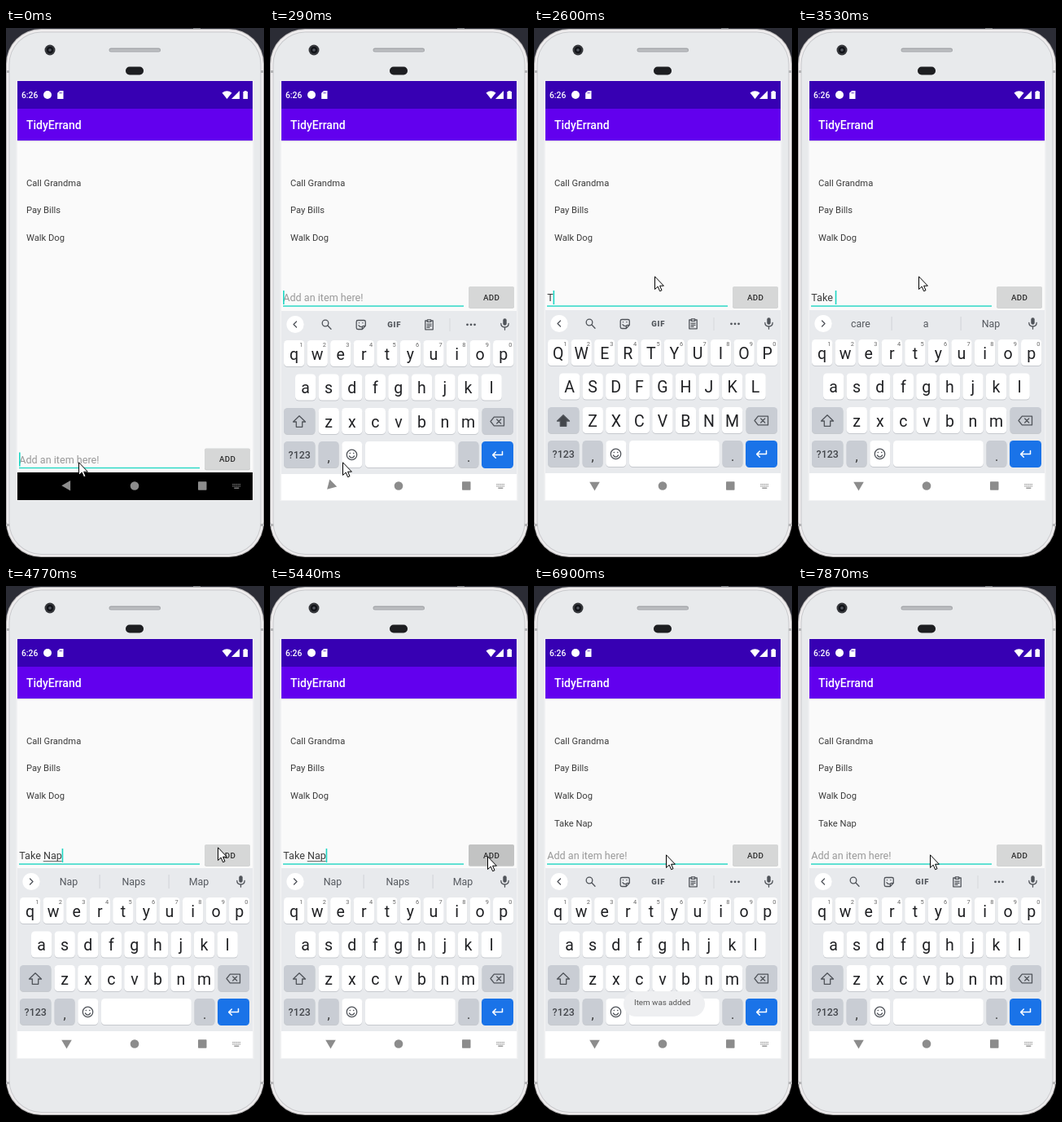
These frames come from a looping animation (317 px wide and 650 px high, 8000 ms). An HTML page:

```html
<!DOCTYPE html>
<html lang="en">
<head>
<meta charset="utf-8">
<title>To-do app</title>
<style>
html, body { margin: 0; width: 100%; height: 100%; overflow: hidden; background: #000; }
svg { display: block; width: 317px; height: 650px; }
text { font-family: Roboto, sans-serif; white-space: pre; }
.mid { text-anchor: middle; }
.line { fill: none; stroke: #50545a; stroke-width: 1.3; stroke-linecap: round; stroke-linejoin: round; }
</style>
</head>
<body>
<svg id="stage" viewBox="0 0 317 650" xmlns="http://www.w3.org/2000/svg"></svg>
<script>
const LOOP = 8000;
const ROW_DROP = 198.5;
const stage = document.getElementById('stage');
const $ = id => document.getElementById(id);

const rect = (x, y, w, h, fill, r = 0, extra = '') =>
  `<rect x="${x}" y="${y}" width="${w}" height="${h}" rx="${r}" fill="${fill}" ${extra}/>`;
const text = (x, y, size, fill, str, extra = '') =>
  `<text x="${x}" y="${y}" font-size="${size}" fill="${fill}" ${extra}>${str}</text>`;
const path = (d, extra = 'class="line"') => `<path d="${d}" ${extra}/>`;
const circle = (x, y, r, fill, extra = '') =>
  `<circle cx="${x}" cy="${y}" r="${r}" fill="${fill}" ${extra}/>`;

function phone() {
  const seams = [52, 608].map(y =>
    rect(0, y, 4, 3, '#b4b4b6') + rect(313, y, 4, 3, '#b4b4b6')).join('');
  return rect(0, 0, 317, 650, '#000') + rect(0, 0, 317, 60, '#2b2c35') +
    rect(230, 0, 9, 3, '#777a80') +
    rect(0, 1, 317, 648, '#b5b3b4', 43) +
    rect(1, 2, 315, 646, '#efedee', 42) +
    rect(3.5, 4.5, 310, 641.5, '#c9cacd', 40) + seams +
    rect(4.5, 5.5, 308, 639.5, '#e8eaec', 39) +
    rect(12.5, 64, 292, 516, '#f1f2f3') +
    circle(54, 27, 6.5, '#34363a') + circle(54, 27, 4, '#111318') + circle(54, 27, 1.8, '#53575f') +
    rect(126.5, 24.5, 63.5, 5, '#a4a6aa', 2.5) + rect(127.5, 26, 61.5, 2.5, '#bcbec1', 1.2) +
    rect(147, 47.5, 22, 10, '#1d1e21', 4.8);
}

function appBars() {
  return rect(14, 65, 289, 34, '#3700b3') + rect(14, 99, 289, 39, '#6200ee') +
    text(19, 86, 10.3, '#fff', '6:26', 'font-weight="500"') +
    circle(51, 82, 5, '#fff') +
    path('M66 77h4.5v10h-7.3v-7.3z', 'fill="#fff"') +
    path('M66.3 78.5v2M68.1 78.5v2', 'stroke="#3700b3" stroke-width=".8"') +
    path('M265.5 79.5q6-4.5 12 0l-6 7.5z', 'fill="#fff"') +
    path('M287 77v10h-10z', 'fill="#fff"') +
    path('M292.8 77h2.8v1h1.4v9h-5.6v-9h1.4z', 'fill="#fff"') +
    text(25, 124.3, 14, '#fff', 'TidyErrand', 'font-weight="500"');
}

function list() {
  return ['Call Grandma', 'Pay Bills', 'Walk Dog', 'Take Nap'].map((s, i) =>
    text(25, 193.5 + i * 33.8, 11.2, '#3c3c3c', s, i === 3 ? 'id="newItem"' : '')).join('');
}

function inputRow() {
  return `<g id="row">` +
    text(16.3, 335.3, 12.6, '#999', 'Add an item here!', 'id="hint"') +
    text(16.3, 335.3, 12.6, '#3c3c3c', '', 'id="typed"') +
    rect(16, 337, 10, 0.9, '#555', 0, 'id="compose"') +
    rect(16, 340.3, 222, 1.5, '#2fd9c7') +
    rect(16, 322, 1.6, 17, '#1cd6c3', 0, 'id="caret"') +
    rect(244, 317.7, 56, 26, '#c4c5c5', 2) +
    rect(244, 317, 56, 26, '#d6d7d7', 2, 'id="button"') +
    text(272, 333.6, 9.8, '#2a2a2a', 'ADD', 'class="mid" font-weight="500" letter-spacing=".3"') + `</g>`;
}

const key = (x, y, w, fill = '#fff') =>
  rect(x, y + 1, w, 32, '#c6c9ce', 4.5) + rect(x, y, w, 32, fill, 4.5);

function letters() {
  const rows = [['qwertyuiop', 17, 382], ['asdfghjkl', 31, 423.5], ['zxcvbnm', 59.6, 465]];
  return rows.map(([chars, x0, y], r) => [...chars].map((c, i) => {
    const x = x0 + i * 28.56;
    return key(x, y, 25.3) +
      text(x + 12.6, y + 23.7, 19.5, '#202124', c, 'class="mid letter"') +
      (r ? '' : text(x + 21.3, y + 8.4, 7.4, '#666', (i + 1) % 10, 'class="mid"'));
  }).join('')).join('');
}

function strip() {
  const dots = [242.5, 247, 251.5].map(x => circle(x, 362.8, 1.4, '#50545a')).join('');
  const tools =
    circle(68, 361, 3.8, 'none', 'class="line"') + path('M71 364l4 4.3') +
    path('M108 357.5h7.5q1.8 0 1.8 1.8v5l-4 4.2h-5.3q-1.8 0-1.8-1.8v-7.4q0-1.8 1.8-1.8zM117.3 364.3h-2.4q-1.6 0-1.6 1.6v2.6M109 363.6q1.2 2.2 3.3 1.8M109.4 360.7h.2M113.8 360.7h.2') +
    text(152.7, 366, 9.6, '#50545a', 'GIF', 'class="mid" font-weight="900" letter-spacing=".7"') +
    path('M192.5 358h-1.7v10.8h9.4v-10.8h-1.7M193.4 356.8h4.2v2.6h-4.2zM193 362.2h5M193 364.3h5M193 366.4h3') +
    rect(220.5, 355, 1, 16, '#d5d8dc') + dots;
  const words = [77, 157, 237].map(x =>
    text(x, 367, 12.4, '#54585e', '', 'class="mid word"')).join('');
  return circle(31, 362.5, 10.6, '#fff') + path('M0 0', 'id="chevron" class="line"') +
    `<g id="tools">${tools}</g>` +
    `<g id="words">${words}${rect(114.6, 354, 1, 17, '#d0d3d7')}${rect(199.6, 354, 1, 17, '#d0d3d7')}</g>` +
    rect(286.3, 355.3, 4.4, 8.5, '#50545a', 2.2) + path('M283.8 361.3q0 4.7 4.7 4.7t4.7-4.7M288.5 366.2v3');
}

function keyboard() {
  const gray = '#c9cdd4';
  const arrow = 'M36 474.7l7.5 7.3h-3.8v6.3h-7.4V482h-3.8z';
  return rect(14, 346, 289, 200, '#e8eaed') + strip() + letters() +
    key(17, 465, 38.5, gray) + path(arrow, 'id="shift" class="line"') +
    key(260.5, 465, 38.5, gray) +
    path('M271 481.5l4.3-5.4h12.2v10.8h-12.2zM278.7 479l5 5M283.7 479l-5 5') +
    key(17, 506, 38.5, gray) + text(36.2, 527, 12.4, '#44474c', '?123', 'class="mid" font-weight="500"') +
    key(59.6, 506, 25, gray) + text(72.2, 531, 16, '#333', ',', 'class="mid"') +
    key(88.3, 506, 25) + circle(100.5, 522.4, 6.2, 'none', 'class="line"') +
    path('M97.4 524q3.1 4.2 6.2 0M98.2 520.5h.3M102.6 520.5h.3') +
    key(117, 506, 110.8) +
    key(231.5, 506, 25, gray) + text(244, 531, 16, '#333', '.', 'class="mid"') +
    rect(260, 506, 39, 33, '#1a73e8', 4.5) +
    path('M285.5 518.6v4h-11.8m3.6-3.6l-3.6 3.6 3.6 3.6', 'class="line" style="stroke:#fff;stroke-width:1.5"');
}

function nav() {
  const dots = [0, 1, 2, 3, 4].map(i => rect(278.3 + i * 2.1, 559, 1.2, 1.3, '#8c8c8c') +
    rect(278.3 + i * 2.1, 561.3, 1.2, 1.3, '#8c8c8c')).join('');
  return rect(14, 545, 289, 34, '#000') +
    rect(14, 545, 289, 34, '#fff', 0, 'id="navLight"') +
    path('M68.3 561.3l10.8-6.3v12.6z', 'id="back" fill="#8c8c8c"') +
    circle(158, 561.5, 5.3, '#8c8c8c') + rect(236, 556.3, 10.5, 10.5, '#8c8c8c', 0.8) +
    dots + rect(280.3, 563.6, 6, 1.3, '#8c8c8c');
}

stage.innerHTML = phone() + appBars() + rect(14, 138, 289, 407, '#fafafa') +
  rect(14, 138, 289, 1, '#e0dee6') + rect(14, 139, 289, 1, '#f2f1f4') +
  list() + inputRow() + nav() + `<g id="keys">${keyboard()}</g>` +
  `<g id="toast">${rect(110, 497, 100, 31, '#eeeff1', 15.5)}${text(123, 514.2, 9.8, '#555', 'Item was added')}</g>` +
  path('M.5.8v15.7l3.7-3.4 2.4 5.6 2.4-1-2.4-5.5h4.8z',
    'id="mouse" fill="#fff" stroke="#000" stroke-width="1" stroke-linejoin="round"');

// Each track is a list of [start, value]; the value holds until the next start.
const tracks = {
  slide: [[0, null], [150, { y: 9, alpha: 0.6, turn: -12 }], [290, { y: 1, alpha: 1, turn: -45 }],
    [410, { y: 0, alpha: 1, turn: -80 }], [530, { y: 0, alpha: 1, turn: -90 }]],
  typed: [[0, ''], [2600, 'T'], [2850, 'Ta'], [3130, 'Tak'], [3270, 'Take'], [3410, 'Take '],
    [3810, 'Take N'], [4090, 'Take Na'], [4380, 'Take Nap'], [5460, '']],
  // start of the underlined part, -1 for none
  compose: [[0, -1], [2720, 0], [3530, -1], [3810, 5], [5460, -1]],
  words: [[0, ''], [2720, 'T The This'], [2990, 'Ta Take Talk'], [3130, 'Tak Take Taken'],
    [3270, 'Take Taken Takes'], [3530, 'care a Nap'], [3950, 'N No Not'], [4240, 'Na Nap Name'],
    [4380, 'Nap Naps Map'], [5460, '']],
  caps: [[0, false], [2450, true], [2720, false]],
  caret: [[0, true], [900, false], [1450, true], [1880, false], [2450, true], [4920, false],
    [5320, true], [5870, false], [6440, true], [6900, false], [7330, true], [7870, false]],
  button: [[0, '#d6d7d7'], [5320, '#c2c3c3'], [5460, '#cacbcb'], [5600, '#d6d7d7']],
  item: [[0, false], [5460, true]],
  toast: [[0, 0], [5600, 0.4], [5730, 0.9], [5870, 1], [7330, 0.8], [7470, 0.45], [7600, 0.15], [7740, 0]],
  mouse: [[0, [89, 532]], [900, [108, 450]], [1035, [139, 332]], [1170, [148, 304]],
    [4650, [205, 310]], [4770, [260, 320]], [4920, [266, 328]], [5040, [267, 331]],
    [5730, [255, 331]], [5870, [228, 330]], [6010, [194, 330]], [6150, [170, 329]], [6290, [162, 329]]]
};

const at = (name, t) => tracks[name].reduce((v, [start, value]) => start <= t ? value : v, null);
const show = (id, on) => $(id).setAttribute('visibility', on ? 'visible' : 'hidden');
const set = (id, attrs) => { for (const k in attrs) $(id).setAttribute(k, attrs[k]); };
const letterNodes = [...document.querySelectorAll('.letter')];
const wordNodes = [...document.querySelectorAll('.word')];

function draw(t) {
  const slide = at('slide', t), typed = at('typed', t), from = at('compose', t);
  const words = at('words', t), caps = at('caps', t), [mx, my] = at('mouse', t);
  const { y, alpha, turn } = slide || { y: 0, alpha: 0, turn: 0 };

  set('row', { transform: `translate(0 ${slide ? 0 : ROW_DROP})` });
  set('keys', { transform: `translate(0 ${y})`, opacity: alpha });
  set('navLight', { opacity: alpha });
  set('back', { transform: `rotate(${turn} 74.5 561.3)` });

  const node = $('typed');
  node.textContent = typed;
  const end = typed ? node.getComputedTextLength() : 0;
  const start = from > 0 ? node.getSubStringLength(0, from) : 0;
  show('hint', !typed);
  show('compose', from >= 0);
  set('compose', { x: 16 + start, width: Math.max(0, end - start) });
  show('caret', at('caret', t));
  set('caret', { x: 16 + end });
  set('button', { fill: at('button', t) });
  show('newItem', at('item', t));

  show('tools', !words);
  show('words', words);
  const parts = words.split(' ');
  wordNodes.forEach((n, i) => { n.textContent = parts[i] || ''; });
  set('chevron', { d: words ? 'M29.5 359l3.5 3.5-3.5 3.5' : 'M32.5 359l-3.5 3.5 3.5 3.5' });
  letterNodes.forEach(n => {
    n.textContent = caps ? n.textContent.toUpperCase() : n.textContent.toLowerCase();
  });
  $('shift').style.fill = caps ? '#44474c' : 'none';

  set('toast', { opacity: at('toast', t) });
  set('mouse', { transform: `translate(${mx} ${my})` });
}

const begin = performance.now();
function tick() {
  draw((performance.now() - begin) % LOOP);
  requestAnimationFrame(tick);
}
tick();
</script>
</body>
</html>
```
